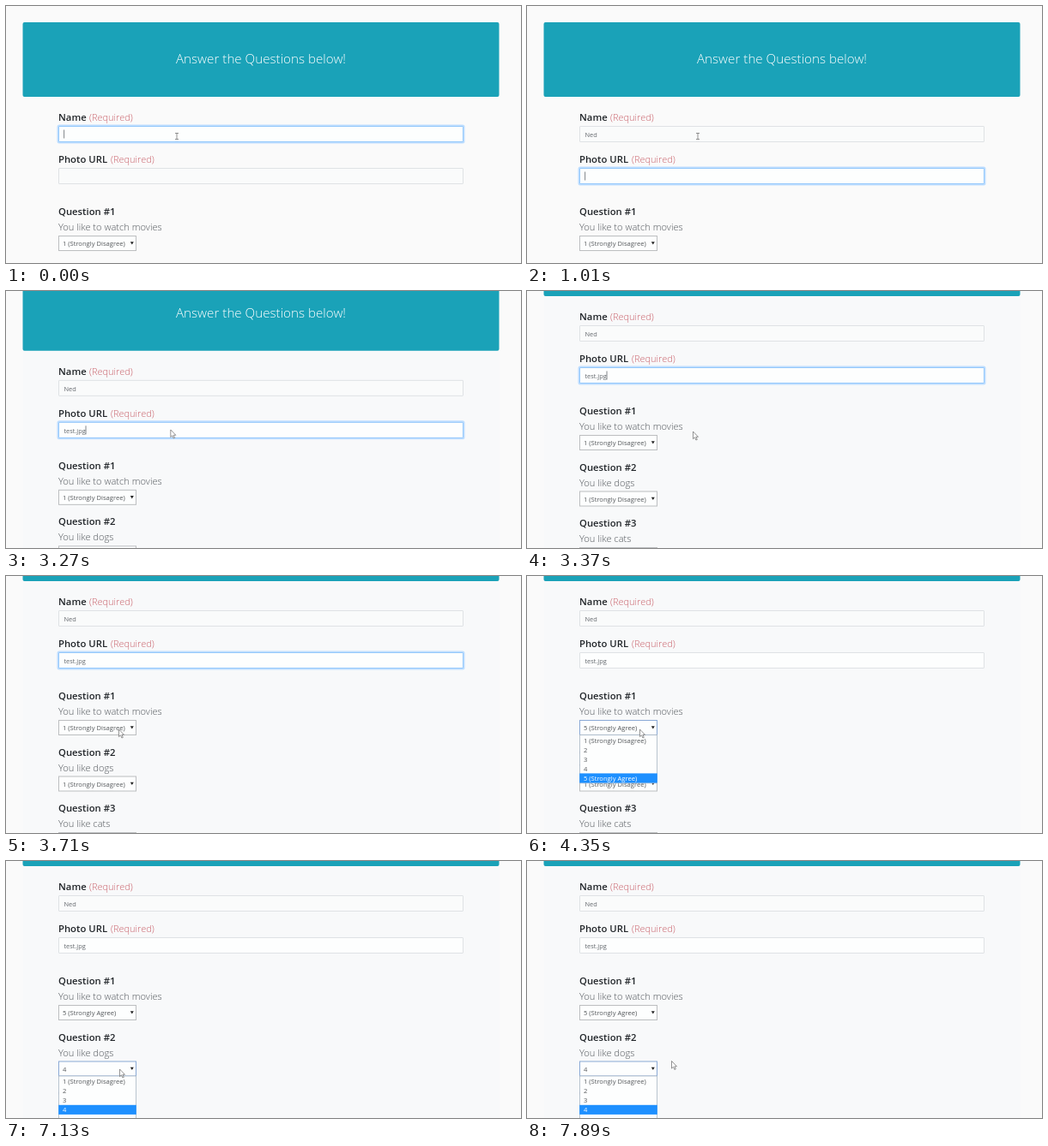
Recreate the animation shown at these times as an HTML page. Size 600x300 px, loop 8000 ms.

```html
<!DOCTYPE html>
<html lang="en">
<head>
<meta charset="utf-8">
<title>Questionnaire</title>
<style>
  html, body { margin: 0; width: 100%; height: 100%; overflow: hidden; background: #fafafa; }
  svg { display: block; width: 600px; height: 300px; }
  text { font-family: "Open Sans", "Noto Sans", sans-serif; white-space: pre; }
  .title { font-size: 15.2px; font-weight: 300; fill: #fff; text-anchor: middle; }
  .head { font-size: 11.3px; font-weight: 600; fill: #212529; }
  .note { font-size: 11px; font-weight: 300; fill: #c9616a; }
  .ask { font-size: 11.1px; font-weight: 300; fill: #50555a; }
  .field { font-size: 7.4px; fill: #62676c; }
  .option { font-size: 7.6px; fill: #55585b; }
</style>
</head>
<body>
<svg id="stage" viewBox="0 0 600 300"></svg>
<script>
const LOOP = 8000;
const stage = document.getElementById('stage');

function add(parent, tag, attrs = {}, text = '') {
  const el = document.createElementNS('http://www.w3.org/2000/svg', tag);
  set(el, attrs);
  el.textContent = text;
  parent.appendChild(el);
  return el;
}
function set(el, attrs) {
  for (const key in attrs) el.setAttribute(key, attrs[key]);
}
const show = (el, on) => set(el, { visibility: on ? 'visible' : 'hidden' });
const label = (parent, cls, x, y, text) => add(parent, 'text', { class: cls, x, y }, text);
const ramp = (t, from, to) => Math.min(1, Math.max(0, (t - from) / (to - from)));
const smooth = p => p * p * (3 - 2 * p);

const panel = add(stage, 'rect', { x: 20, y: 0, width: 555, height: 300, fill: '#f8f9fa' });
const page = add(stage, 'g');
add(page, 'rect', { x: 19.5, y: 19, width: 555, height: 87, rx: 2, fill: '#1aa2b8' });
label(page, 'title', 297, 67, 'Answer the Questions below!');

function makeField(y, name, noteX) {
  label(page, 'head', 61, y - 6, name);
  label(page, 'note', noteX, y - 6, '(Required)');
  const glow = add(page, 'rect', { x: 59.5, y: y - 1.5, width: 475, height: 22, rx: 2.5, fill: '#bfdeff' });
  const box = add(page, 'rect', { x: 61.5, y: y + .5, width: 471, height: 18, rx: .5, 'stroke-width': 1 });
  const text = label(page, 'field', 67.5, y + 12.7, '');
  const caret = add(page, 'rect', { y: y + 4.5, width: .8, height: 10, fill: '#62676c' });
  return { glow, box, text, caret };
}

function drawField(field, value, focus, caretOn) {
  field.text.textContent = value;
  set(field.glow, { opacity: focus });
  set(field.box, {
    fill: focus > .5 || field.filled ? '#fdfefe' : '#fafbfb',
    stroke: focus > .5 ? '#94c8fb' : '#dfe2e5'
  });
  const width = value ? field.text.getComputedTextLength() : 0;
  set(field.caret, { x: 67.3 + width });
  show(field.caret, caretOn);
}

const OPTIONS = ['1 (Strongly Disagree)', '2', '3', '4', '5 (Strongly Agree)'];
const ROW = 11.1;

function makeQuestion(number, ask) {
  const y = 244 + (number - 1) * 65.5;
  label(page, 'head', 61, y, 'Question #' + number);
  label(page, 'ask', 61, y + 18, ask);
  const box = add(page, 'rect', { x: 61.5, y: y + 24.5, width: 90, height: 17, fill: '#fdfefe', stroke: '#bcbec0' });
  const text = label(page, 'option', 66, y + 36, OPTIONS[0]);
  add(page, 'path', { d: `M144.8 ${y + 31.2}h4l-2 3.4z`, fill: '#222' });
  return { y, box, text };
}

function makeList(question) {
  const top = question.y + 42;
  const group = add(page, 'g');
  add(group, 'rect', { x: 61.5, y: top - .5, width: 90, height: ROW * 5 + .8, fill: '#fdfefe', stroke: '#a9b6c4', 'stroke-width': .8 });
  const bar = add(group, 'rect', { x: 61.2, width: 90.6, height: ROW, fill: '#1e90ff' });
  const rows = OPTIONS.map((name, i) => label(group, 'option', 66, top + 8.6 + i * ROW, name));
  question.list = { group, bar, rows, top };
}

function drawQuestion(question, choice, open, active) {
  const { group, bar, rows, top } = question.list;
  question.text.textContent = OPTIONS[choice];
  set(question.box, { stroke: active ? '#8aa9d6' : '#bcbec0' });
  show(group, open);
  set(bar, { y: top + choice * ROW });
  rows.forEach((row, i) => { row.style.fill = i === choice ? '#fff' : ''; });
}

const nameField = makeField(140, 'Name', 97);
const photoField = makeField(189, 'Photo URL', 122);
const movies = makeQuestion(1, 'You like to watch movies');
const dogs = makeQuestion(2, 'You like dogs');
makeQuestion(3, 'You like cats');
makeList(movies);
makeList(dogs);

const arrow = add(stage, 'path', {
  d: 'M0 0V8.6L2 6.8L3.4 10L4.8 9.4L3.4 6.3H6Z',
  fill: '#fff', stroke: '#666', 'stroke-width': .7
});
const beam = add(stage, 'path', {
  d: 'M-2 -3.5H2M0 -3.5V3.5M-2 3.5H2',
  fill: 'none', stroke: '#777', 'stroke-width': .8
});

// Pointer stops: time, x, y
const PATH = [
  [2950, 199, 152], [3150, 190.5, 160], [3210, 191, 161], [3370, 193.5, 164],
  [3710, 131.5, 179], [4510, 131.5, 179], [4680, 203, 181], [4830, 203, 181],
  [5060, 170, 246], [5270, 132.5, 243], [7700, 132.5, 243], [7890, 168.5, 233.5]
];

function pointerAt(t) {
  const next = PATH.findIndex(stop => stop[0] > t);
  if (next === 0) return PATH[0].slice(1);
  if (next < 0) return PATH[PATH.length - 1].slice(1);
  const [t0, x0, y0] = PATH[next - 1];
  const [t1, x1, y1] = PATH[next];
  const p = smooth(ramp(t, t0, t1));
  return [x0 + (x1 - x0) * p, y0 + (y1 - y0) * p];
}

const typed = (word, times, t) => word.slice(0, times.filter(time => t >= time).length);
const between = (t, from, to) => t >= from && t < to;

function draw(t) {
  const scroll = 100 * smooth(ramp(t, 3210, 3360));
  set(page, { transform: `translate(0 ${-scroll})` });
  show(panel, scroll > 0);

  const tab = ramp(t, 860, 1000);
  const blur = ramp(t, 4090, 4210);
  const name = typed('Ned', [390, 640, 740], t);
  const photo = typed('test.jpg', [1130, 1210, 1460, 1570, 1670, 1850, 2000, 2120], t);
  photoField.filled = photo !== '';
  drawField(nameField, name, 1 - tab, t < 210 || between(t, 390, 860));
  drawField(photoField, photo, tab * (1 - blur),
    between(t, 860, 2680) || between(t, 3150, 3680));

  drawQuestion(movies, t >= 4350 ? 4 : 0, between(t, 4110, 4510), between(t, 4110, 4680));
  drawQuestion(dogs, t >= 7130 ? 3 : 0, t >= 5420, t >= 5270);

  const [x, y] = pointerAt(t);
  const overField = y < 159 && scroll === 0;
  set(arrow, { transform: `translate(${x} ${y})` });
  set(beam, { transform: `translate(${x} ${y})` });
  show(arrow, !overField);
  show(beam, overField);
}

const start = performance.now();
function tick() {
  draw((performance.now() - start) % LOOP);
  requestAnimationFrame(tick);
}
draw(0);
requestAnimationFrame(tick);
</script>
</body>
</html>
```
